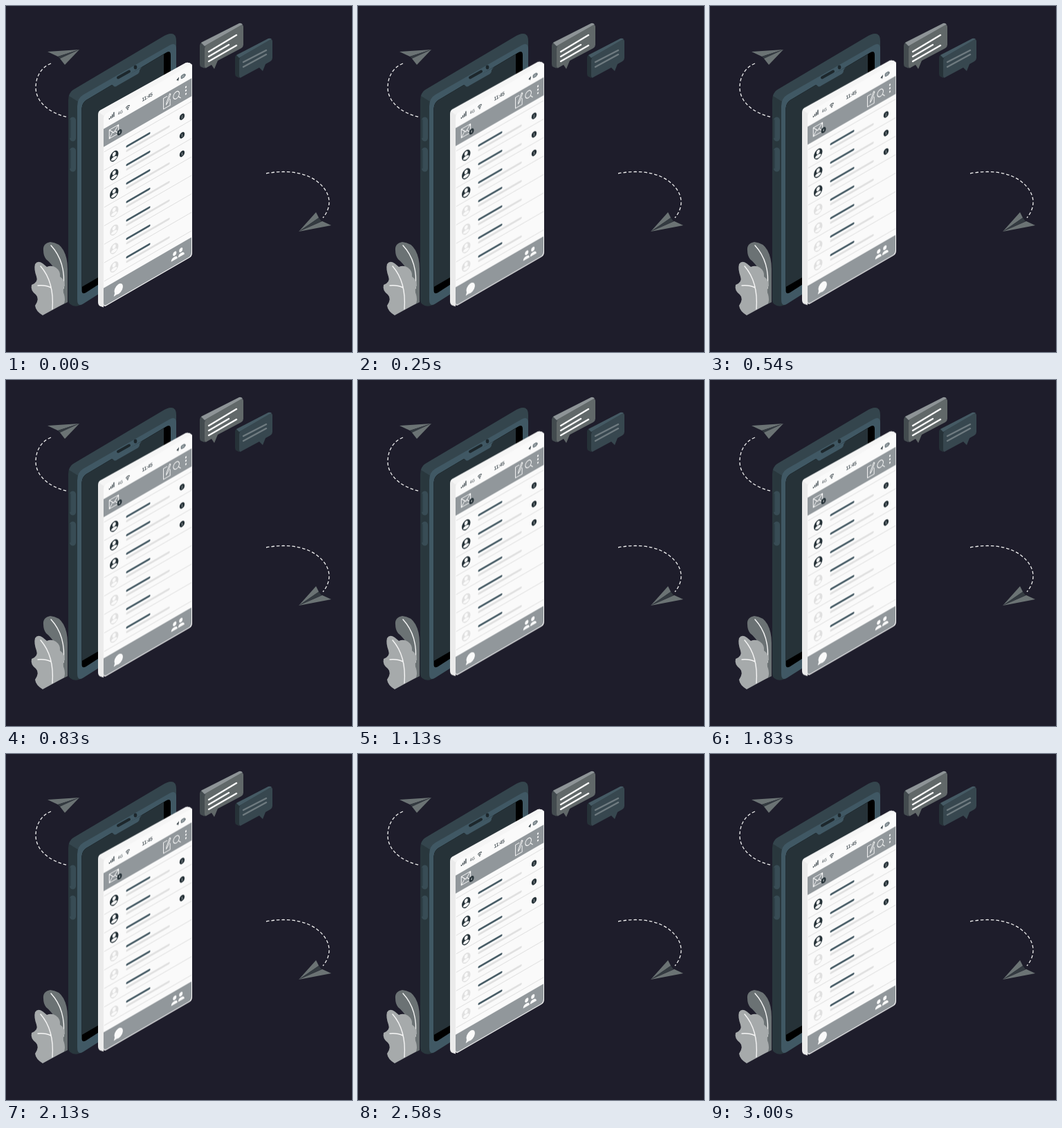
An HTML page that plays this animation: 500 by 500 pixels, repeating every 3040 ms.

```html
<!DOCTYPE html>
<html lang="en">
<head>
<meta charset="utf-8">
<title>Floating inbox</title>
<style>
html, body { margin: 0; width: 100%; height: 100%; overflow: hidden; background: #1e1d2b; }
svg { display: block; width: 100vw; height: 100vh; }
text { font-family: "Liberation Sans", Arial, sans-serif; text-anchor: middle; }
.line { fill: none; stroke-linecap: round; stroke-linejoin: round; }
.dash { fill: none; stroke: #f2f2f2; stroke-width: 1.3; stroke-dasharray: 4.5 3; }
#panel { animation: float 1520ms cubic-bezier(.35, .21, .65, .79) -40ms infinite alternate; }
@keyframes float {
  from { transform: translateY(.2px); }
  to { transform: translateY(-9.4px); }
}
</style>
</head>
<body>
<svg viewBox="0 0 500 500">
  <!-- plant -->
  <g id="plant">
    <path fill="#6b7274" d="M54 353 Q53 343 64 341 Q77 342 83 353 Q89 364 89 380 V428 L70 437 Q82 405 72 384 Q66 372 58 366 Q54 361 54 353Z"/>
    <path class="line" stroke="#f5f5f5" stroke-width="1.4" d="M65 346 Q87 370 83 408"/>
    <path fill="#a6aaab" d="M42 373 Q46 367 53 372 L59 377 Q66 374 72 378 Q79 383 78 391 Q85 396 85 404 Q81 410 84 417 Q86 424 84 430 L53 447 Q43 441 42 433 Q49 423 43 417 Q35 411 37 403 Q47 399 44 391 Q40 380 42 373Z"/>
    <path class="line" stroke="#f5f5f5" stroke-width="1.4" d="M50 376 Q70 399 67 438 M46 404 Q57 403 65 407"/>
  </g>

  <!-- trails and paper planes -->
  <path class="dash" d="M65 83 C50 89 43 103 43 118 C43 139 64 156 91 161"/>
  <path fill="#6b7374" d="M60 66 L106 63 L75 73Z"/>
  <path fill="#343b41" d="M75 73 L106 63 L78 76Z"/>
  <path fill="#6b7374" d="M78 76 L106 63 L85 85Z"/>
  <path class="dash" d="M376 242 C402 237 430 239 449 253 C470 269 472 289 458 306"/>
  <path fill="#6b7374" d="M423 326 L448 298 L452 306Z"/>
  <path fill="#343b41" d="M423 326 L452 306 L456 311Z"/>
  <path fill="#6b7374" d="M423 326 L457 311 L470 317Z"/>

  <!-- chat bubbles -->
  <g>
    <path fill="#434b4f" d="M280 57 Q280 54 283 52 L337 25 L342 28 L287 60 V90 L282 88 Q280 87 280 84Z"/>
    <path fill="#8e9497" d="M282 53 L337 25 Q340 24 342 27 L287 58Z"/>
    <path fill="#616869" d="M287 61 Q287 58 290 56 L339 28 Q343 26 343 30 V56 Q343 59 340 61 L306 79 L301 91 L297 85 L290 89 Q287 91 287 87Z"/>
    <path class="line" stroke="#fafafa" stroke-width="2.400" d="M293 66 L333 42 M293 73 L322 56 M293 80 L333 57"/>
  </g>
  <g>
    <path fill="#263238" d="M331 74 Q331 72 334 70 L380 47 L384 49 L337 77 V104 L333 102 Q331 101 331 98Z"/>
    <path fill="#455a64" d="M333 71 L379 47 Q382 46 384 48 L337 75Z"/>
    <path fill="#37474f" d="M337 78 Q337 75 340 73 L381 49 Q385 47 385 51 V75 Q385 78 382 80 L375 84 L371 94 L366 89 L340 103 Q337 105 337 101Z"/>
    <path class="line" stroke="#6f7b80" stroke-width="2.400" d="M343 81 L376 64 M343 88 L376 70"/>
  </g>

  <!-- phone -->
  <g>
    <path fill="#29373d" d="M90 424 V136 Q90 125 99 120 L229 43 Q246 34 246 51 V345 L112 430 Q100 437 93 431 Q90 429 90 424Z"/>
    <path fill="#34454d" d="M91 130 Q93 123 99 120 L229 43 Q246 34 246 51 V62 L112 132 L104 138Z"/>
    <path fill="#405864" d="M103 424 V145 Q103 133 112 128 L236 57 Q246 51 246 62 V345 L112 430 Q103 436 103 424Z"/>
    <path fill="#000" d="M109.500 411 V148 Q110 140 116 136 L232 67 Q238 64 238 71 V335 L115 414.500 Q109.500 417 109.500 411Z"/>
    <path fill="#263238" d="M109.500 406 V148 Q110 140 116 136 L228 69.500 V337Z"/>
    <path fill="#405864" d="M150 114 Q154 113 155 115 Q157 118 161 115 L189 99 Q193 97 193 93 Q194 90 197 88Z"/>
    <path class="line" stroke="#1d272c" stroke-width="4" d="M162 103.500 L178 94.500"/>
    <ellipse cx="187" cy="88.500" rx="2.300" ry="3" fill="#1d272c"/>
    <path class="line" stroke="#384c55" stroke-width="9" d="M96.500 165 V191 M96.500 209 V235"/>
    <path class="line" stroke="#2f4048" stroke-width="2" d="M93 165 V190 M93 209 V234"/>
  </g>

  <!-- floating screen -->
  <g id="panel">
    <path fill="#ebebeb" d="M133 157 Q133 152 137 150.300 L260 82 Q265 80.500 269 85 V100 L141 168 V435.400 L136 433.800 Q133 432.300 133 428Z"/>
    <path fill="#f5f5f5" d="M134 153.500 L137 150.300 L260 82 Q265 80.500 269 85 L141 158.500Z"/>
    <g transform="matrix(.866 -.5 0 1 141 157)">
      <path fill="#fafafa" d="M0 5.500 Q0 .5 5 .5 H143 Q147.800 .5 147.800 5.500 V274 Q147.800 278.500 143 278.500 H5 Q0 278.500 0 274Z"/>
      <path fill="#91979b" d="M0 20.700 H147 V46.700 H0Z M0 250.600 H146.600 V272 Q146.600 277.200 142 277.200 H5 Q0 277.200 0 272Z"/>

      <g fill="#263238">
        <path d="M9 9.800 h1.400 v2 h-1.400z M11.500 8.300 h1.400 v3.500 h-1.400z M14 6.800 h1.400 v5 h-1.400z M16.500 5 h1.400 v6.800 h-1.400z"/>
        <text x="28" y="12.800" font-size="6">4G</text>
        <text x="73" y="13.400" font-size="7.300" stroke="#263238" stroke-width=".1">11:45</text>
        <path d="M121.200 11 L126 8.500 L124.500 14 L123.500 11.800Z"/>
        <path class="line" stroke="#263238" stroke-width="1.100" d="M37.400 8.700 Q40.400 6 43.400 8.700 M38.800 10.700 Q40.400 9.300 42 10.700"/>
        <circle cx="40.400" cy="12.400" r=".9"/>
        <rect x="129.500" y="8.500" width="6" height="4.500" rx="1" fill="#98a1a5" stroke="#37474f" stroke-width=".7"/>
        <path d="M136 9.800 h.8 v2 h-.8z"/>
      </g>

      <g class="line" stroke="#fafafa" stroke-width="1.100">
        <path d="M9.500 27 H25 V39.500 H9.500Z L17 34.500 L25 27 M9.500 39.500 L15 33 M25 39.500 L19 33"/>
        <path d="M106 26.500 H100 V42 H111 V33 M104.500 38 L105.200 34.500 L110.300 25 L112 26.200 L107 36Z"/>
        <circle cx="121.400" cy="32.500" r="5"/>
        <path d="M125 36.200 L128.500 40"/>
      </g>
      <g fill="#fafafa">
        <circle cx="137.400" cy="28.800" r="1.300"/>
        <circle cx="137.400" cy="33.700" r="1.300"/>
        <circle cx="137.400" cy="38.600" r="1.300"/>
        <path d="M17 271.500 L18.500 267.500 A7.200 7.200 0 1 1 22 271Z"/>
        <circle cx="118.700" cy="260" r="3"/>
        <circle cx="129" cy="260" r="3"/>
        <path d="M112.800 269 Q112.800 264.500 118.700 264.500 Q123.300 264.500 123.300 269Z M124.500 269 Q124.500 264.500 129 264.500 Q135 264.500 135 269Z"/>
      </g>
      <circle cx="26.600" cy="38.800" r="4" fill="#263238"/>
      <text x="26.600" y="40.600" font-size="5" fill="#fafafa">4</text>
      <g id="rows"></g>
    </g>
  </g>
</svg>
<script>
const pitch = 26.7;
const badges = [2, 1, 1];

function row(i) {
  const unread = i < badges.length;
  const ink = unread ? "#263238" : "#e0e0e0";
  const badge = unread
    ? `<circle cx="131" cy="68.5" r="4.2" fill="${ink}"/>
       <text x="131" y="70.4" font-size="5" fill="#fafafa">${badges[i]}</text>`
    : "";
  return `<g transform="translate(0 ${i * pitch})">
    <path d="M1 81 H147" stroke="#d9d9d9" stroke-width=".8"/>
    <circle cx="17.6" cy="68.7" r="7.2" fill="${ink}"/>
    <circle cx="17.6" cy="66" r="2.9" fill="#fafafa"/>
    <path fill="#fafafa" d="M12.6 72.4 Q13 69.6 17.6 69.6 Q22.2 69.6 22.6 72.4 Q17.6 76.6 12.6 72.4Z"/>
    <path class="line" stroke="#455a64" stroke-width="3" d="M39 65.3 H76.5"/>
    <path class="line" stroke="#e0e0e0" stroke-width="3" d="M39 71.8 H109"/>
    ${badge}
  </g>`;
}

const divider = `<path d="M1 54.3 H147" stroke="#d9d9d9" stroke-width=".8"/>`;
document.getElementById("rows").innerHTML =
  divider + Array.from({ length: 7 }, (_, i) => row(i)).join("");
</script>
</body>
</html>
```
